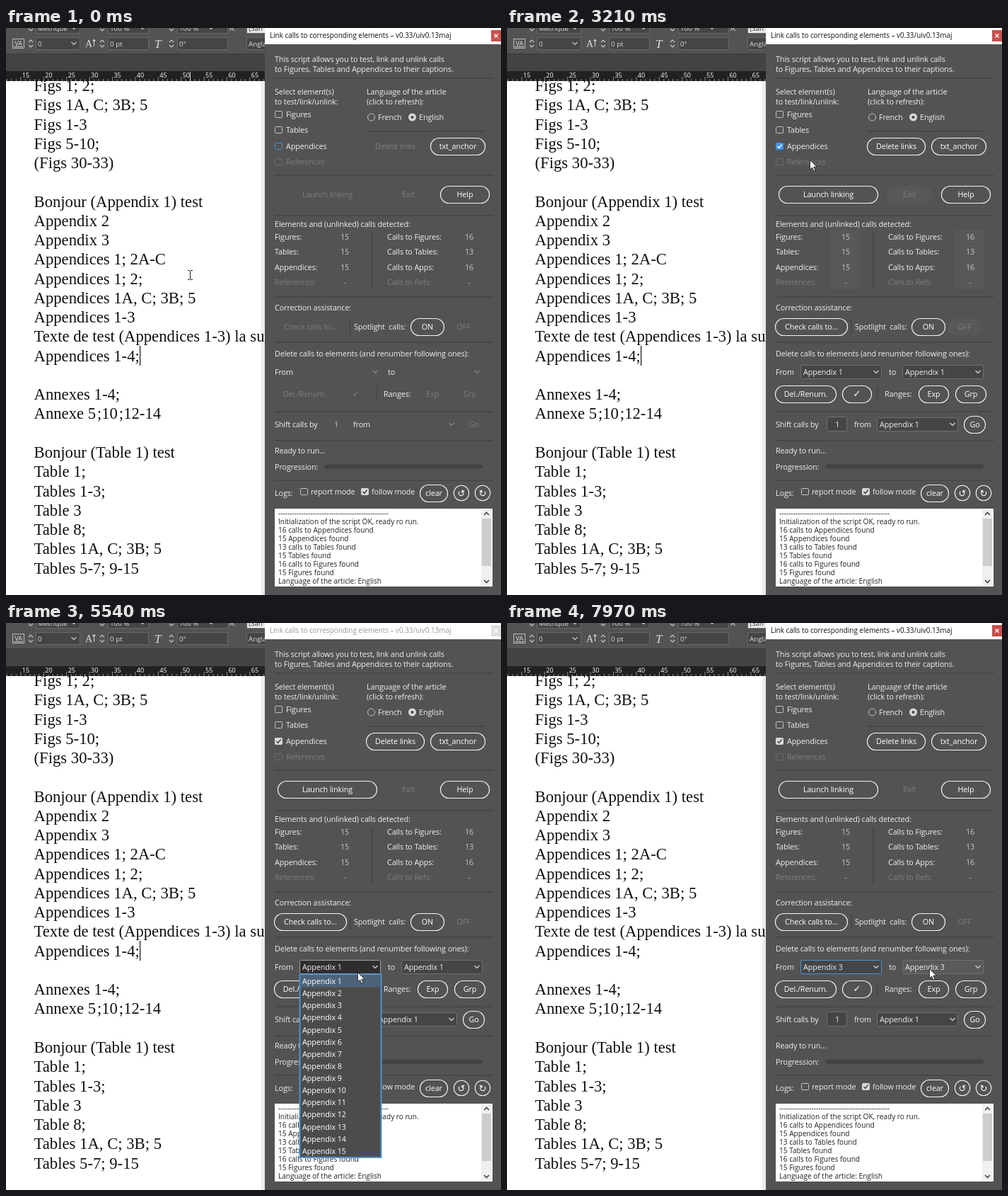
An HTML page for the animation above (8000 ms loop, 700x801 px).

```html
<!DOCTYPE html>
<html lang="en">
<head>
<meta charset="utf-8">
<title>Link calls panel</title>
<style>
html, body { margin: 0; width: 100%; height: 100%; overflow: hidden; background: #fff; }
svg { display: block; width: 700px; height: 801px; }
text { white-space: pre; }
.ui { font: 10.8px "Open Sans", "Noto Sans", sans-serif; letter-spacing: -.1px; }
.title { font: 9.9px "Open Sans", "Noto Sans", sans-serif; }
.log { font: 10.1px "Open Sans", "Noto Sans", sans-serif; }
.bar { font: 9.8px "Open Sans", "Noto Sans", sans-serif; }
.rule { font: 9px "Open Sans", "Noto Sans", sans-serif; }
.doc { font: 22.7px "Liberation Serif", "Times New Roman", serif; }
.sym { font: 13px "DejaVu Sans", sans-serif; }
</style>
</head>
<body>
<svg id="stage" viewBox="0 0 700 801">
  <g id="page"></g>
  <g id="panel"></g>
  <g id="list"></g>
  <g id="pointer"></g>
</svg>
<script>
const LOOP = 8000;
const TICK = 2650, OPEN = 5110, PICK = 6690;
const LIGHT = '#f0f0f0', DIM = '#7e7e7e', BG = '#535353', FIELD = '#454545', BLUE = '#4b93d6';

// Pointer moves: start, end, number of steps, then [step, x, y]
const moves = [
  [280, 1260, 8, [0, 260, 349], [2, 288, 316], [5, 392, 214], [8, 461, 142]],
  [1380, 2360, 8, [0, 461, 142], [2, 463, 134], [5, 446, 174], [8, 427, 166]],
  [3210, 4150, 8, [0, 427, 166], [2, 429, 205], [5, 421, 370], [7, 418, 422], [8, 424, 446]],
  [4270, 5110, 7, [0, 424, 446], [3, 464, 476], [6, 498, 486], [7, 498, 486]],
  [5540, 6540, 8, [0, 498, 486], [3, 496, 508], [6, 490, 533], [8, 489, 538]],
  [6690, 7670, 8, [0, 489, 538], [2, 491, 522], [4, 492, 512], [6, 498, 508], [8, 556, 494]],
  [7820, 7970, 2, [0, 556, 494], [2, 597, 488]]
];

function pointerAt(t) {
  let pos = [260, 349];
  for (const [start, end, n, ...pts] of moves) {
    if (t < start) break;
    // steps are not quite evenly spaced, hence the slack
    const step = Math.min(n, 1 + Math.floor((t - start) / (end - start) * (n - 1) + .1));
    const i = Math.max(1, pts.findIndex(p => p[0] >= step));
    const [a, b] = [pts[i - 1], pts[i]];
    const k = (step - a[0]) / (b[0] - a[0]);
    pos = [1, 2].map(j => Math.round(a[j] + (b[j] - a[j]) * k));
  }
  return pos;
}

const rect = (x, y, w, h, fill, more = '') =>
  `<rect x="${x}" y="${y}" width="${w}" height="${h}" fill="${fill}" ${more}/>`;
const text = (x, y, s, fill = LIGHT, cls = 'ui', anchor = 'start') =>
  `<text x="${x}" y="${y + 4}" fill="${fill}" class="${cls}" text-anchor="${anchor}">${s}</text>`;
const mid = (x, y, s, fill, cls) => text(x, y, s, fill, cls, 'middle');
const path = (d, stroke, width = 1, fill = 'none') =>
  `<path d="${d}" stroke="${stroke}" stroke-width="${width}" fill="${fill}"/>`;
const within = ([x, y], l, t, r, b) => x >= l && x <= r && y >= t && y <= b;
const chevron = (x, y, c) => path(`M${x - 3.5} ${y - 2}l3.5 3.5l3.5 -3.5`, c, 1.2);

// state: 0 disabled, 1 normal, 2 hovered; tint marks a faint disabled pill
function button(l, r, y, label, state = 1, tint = false, cls = 'ui') {
  const c = (l + r) / 2;
  let shape = '';
  if (state || tint) {
    const fill = state === 2 ? '#fff' : state ? 'none' : '#585858';
    shape = rect(l + .5, y - 11.5, r - l - 1, 24, fill, `rx="12" stroke="${state ? '#f4f4f4' : 'none'}" stroke-width="1.2"`);
  }
  return shape + mid(c, y, label, state === 2 ? '#333' : state ? '#fff' : DIM, cls);
}

function check(x, y, mode, border = '#b4b4b4') {
  const fill = { off: 'none', on: '#d8d8d8', focus: '#3f95f0' }[mode];
  const edge = mode === 'off' ? border : fill;
  const mark = mode === 'off' ? '' : path(`M${x - 3} ${y}l2.2 2.4l4 -5`, mode === 'on' ? '#404040' : '#fff', 1.5);
  return rect(x - 5, y - 4.5, 10, 9, fill, `rx="1" stroke="${edge}"`) + mark;
}

function select(l, y, label, on, fill = FIELD, border = '#6f6f6f') {
  if (!on) return chevron(l + 107, y, '#8c8c8c');
  return rect(l + .5, y - 9.5, 114, 19, fill, `rx="1" stroke="${border}"`) +
    text(l + 4, y, label) + chevron(l + 107, y, '#dcdcdc');
}

const docLines = ['Figs 1; 2;', 'Figs 1A, C; 3B; 5', 'Figs 1-3', 'Figs 5-10;', '(Figs 30-33)', '',
  'Bonjour (Appendix 1) test', 'Appendix 2', 'Appendix 3', 'Appendices 1; 2A-C', 'Appendices 1; 2;',
  'Appendices 1A, C; 3B; 5', 'Appendices 1-3', 'Texte de test (Appendices 1-3) la suite', 'Appendices 1-4;', '',
  'Annexes 1-4;', 'Annexe 5\u200a;10\u200a;12-14', '', 'Bonjour (Table 1) test', 'Table 1;', 'Tables 1-3;', 'Table 3',
  'Table 8;', 'Tables 1A, C; 3B; 5', 'Tables 5-7; 9-15'];

const logLines = ['-'.repeat(48), 'Initialization of the script OK, ready ro run.', '16 calls to Appendices found',
  '15 Appendices found', '13 calls to Tables found', '15 Tables found', '16 calls to Figures found',
  '15 Figures found', 'Language of the article: English'];

function spinner(x, y) {
  return path(`M${x + 2} ${y - 2}l3 -3l3 3M${x + 2} ${y + 2}l3 3l3 -3`, '#c8c8c8', 1.2);
}

function toolbar() {
  let s = rect(0, 0, 366, 37, BG) + rect(0, 37, 366, 24, '#434343') + rect(0, 36, 366, 1, '#3a3a3a');
  for (const [x, w, top, value] of [[42, 62, 'Métrique', '0'], [144, 57, '100 %', '0 pt'], [242, 71, '100 %', '0°'], [340, 30, '[San', 'Angla']]) {
    s += rect(x + .5, -8.5, w, 16, x > 330 ? '#e8e8e8' : FIELD, 'stroke="#686868"') +
      rect(x + .5, 13.5, w, 17, FIELD, 'stroke="#686868"') +
      text(x + 3, 0, top, x > 330 ? '#333' : '#ddd', 'bar') + text(x + 3, 22, value, '#ddd', 'bar');
  }
  for (const x of [30, 131, 229]) s += spinner(x, 22) + spinner(x, -1);
  s += rect(9.5, 15.5, 16, 13, 'none', 'stroke="#bbb"') + mid(17.5, 21, 'VA', '#ddd', 'rule') +
    path('M11 26.5h13', '#ccc') + chevron(96, 22, '#ccc') + chevron(96, 0, '#ccc') +
    chevron(193, 0, '#ccc') + chevron(290, 0, '#ccc') + text(316, 0, 'A:', '#ddd', 'bar') +
    `<text x="112" y="27" class="doc" fill="#ddd" style="font-size:14px">A</text>` + path('M124.5 26v-9m-2 2l2 -3l2 3', '#ddd') +
    `<text x="210" y="28" class="doc" fill="#ddd" style="font-size:17px;font-style:italic">T</text>`;
  s += rect(0, 61, 366, 14, '#212121');
  for (let i = 0; i < 60; i++) {
    const x = (-11.5 + i * 6.48).toFixed(1);
    s += path(`M${x} ${i % 5 ? 72 : 69}V75`, '#aaa', .8);
  }
  for (let n = 15, x = 28; n <= 65; n += 5, x += 32.4) s += mid(x, 66, n, '#fff', 'rule');
  return s;
}

function pageView() {
  return rect(0, 0, 366, 801, '#fff') + rect(361, 75, 5, 726, '#ececec') +
    docLines.map((s, i) => `<text x="39.5" y="${(89 + i * 27.26).toFixed(1)}" class="doc" fill="#111">${s}</text>`).join('') +
    toolbar();
}

function panelView(t, pos) {
  const on = t >= TICK, open = t >= OPEN && t < PICK, picked = t >= PICK;
  const tint = on && t < OPEN;
  const live = on ? 1 : 0;
  const hover = (l, top, r, b) => on && !open && within(pos, l, top, r, b);
  const fieldFill = l => hover(l, 476, l + 114, 496) ? '#5a5a5a' : FIELD;
  const toLabel = 'Appendix ' + (picked ? 3 : open ? hoveredItem(t, pos) : 1);

  let s = rect(366, 0, 334, 801, BG) + rect(366, 0, 334, 23, '#fff') +
    text(373, 10, 'Link calls to corresponding elements – v0.33/uiv0.13maj', open ? '#999' : '#111', 'title') +
    rect(686, 3, 14, 16, open ? '#dedede' : '#c9504c') +
    path('M690.5 8.5l5 5m0 -5l-5 5', '#fff', 1.3);

  for (const y of [70, 207, 264, 379, 443, 541, 582, 638]) s += rect(380, y, 309, 2, '#484848');
  s += rect(509, 145, 169, 2, '#484848');
  for (const [x, y, h] of [[517, 289, 79], [486, 412, 21], [523, 506, 22]]) s += rect(x, y, 1.5, h, '#454545');

  const labels = [[380, 44, 'This script allows you to test, link and unlink calls'],
    [380, 58, 'to Figures, Tables and Appendices to their captions.'],
    [380, 90, 'Select element(s)'], [380, 103.5, 'to test/link/unlink:'],
    [510, 90, 'Language of the article'], [510, 103.5, '(click to refresh):'],
    [526, 126, 'French'], [584, 126, 'English'],
    [380, 277, 'Elements and (unlinked) calls detected:'],
    [380, 395, 'Correction assistance:'], [492, 422, 'Spotlight  calls:'],
    [380, 460, 'Delete calls to elements (and renumber following ones):'],
    [380, 486, 'From'], [540, 486, 'to'], [534, 517, 'Ranges:'],
    [380, 560, 'Shift calls by'], [491, 560, 'from'],
    [380, 597, 'Ready to run...'], [380, 620, 'Progression:'],
    [380, 657, 'Logs:'], [431, 655, 'report mode'], [517, 655, 'follow mode']];
  s += labels.map(l => text(...l)).join('');

  const boxState = !on ? 'off' : t < OPEN ? 'focus' : 'on';
  ['Figures', 'Tables', 'Appendices', 'References'].forEach((name, i) => {
    const y = 122 + i * 22.3, last = i === 3;
    s += check(385.5, Math.round(y), i === 2 ? boxState : 'off', last ? '#6d6d6d' : i === 2 ? BLUE : '#c4c4c4') +
      text(396, y, name, last ? DIM : LIGHT);
    const row = 295 + i * 21.4, c = last ? DIM : LIGHT, v = last ? '#aaa' : '#c9c6cf';
    if (tint) s += rect(457, row - 10, 42, 20, '#585858') + rect(633, row - 10, 42, 20, '#585858');
    s += text(380, row, name + ':', c) + text(539, row, 'Calls to ' + ['Figures', 'Tables', 'Apps', 'Refs'][i] + ':', c) +
      mid(479, row, last ? '-' : 15, v) + mid(655, row, [16, 13, 16, '-'][i], v);
  });

  s += `<circle cx="516.5" cy="126" r="5" fill="none" stroke="#c4c4c4"/>` +
    `<circle cx="574.5" cy="126" r="5.5" fill="#d8d8d8"/><circle cx="574.5" cy="126" r="2" fill="#444"/>`;

  s += button(509, 592, 167, 'Delete links', live) + button(600, 678, 167, 'txt_anchor') +
    button(384, 525, 235, 'Launch linking', live) + button(536, 602, 235, 'Exit', 0, tint) + button(614, 684, 235, 'Help') +
    button(379, 482, 422, 'Check calls to...', hover(379, 410, 482, 435) ? 2 : live) +
    button(572, 620, 422, 'ON') + button(623, 671, 422, 'OFF', 0, tint) +
    button(379, 466, 517, 'Del./Renum.', live) +
    button(474, 516, 517, '✓', hover(474, 505, 516, 530) ? 2 : live, false, 'sym') +
    button(582, 625, 517, 'Exp', live) + button(634, 678, 517, 'Grp', live) +
    button(646, 677, 560, 'Go', live) + button(585, 625, 657, 'clear');
  for (const [x, glyph] of [[644, '↺'], [674, '↻']])
    s += `<circle cx="${x}" cy="657" r="10.7" fill="none" stroke="#f4f4f4" stroke-width="1.1"/>` + mid(x, 657.5, glyph, '#fff', 'sym');

  s += select(415, 486, 'Appendix ' + (picked ? 3 : 1), on, open ? '#2e2e2e' : fieldFill(415), picked ? BLUE : open ? '#a0a0a0' : undefined) +
    select(559, 486, toLabel, on, fieldFill(559)) +
    select(523, 560, 'Appendix 1', on);
  if (on) s += rect(452.5, 549.5, 28, 20, FIELD, 'rx="1" stroke="#6f6f6f"');
  s += mid(467, 560, 1, on ? LIGHT : '#c8c8c8');

  s += rect(450, 616.5, 224, 6, '#434343', 'rx="3"') +
    check(421.5, 655, 'off', '#c4c4c4') + check(507.5, 655, 'on');

  s += rect(380, 679, 308, 110, '#fff') +
    logLines.map((l, i) => text(385, 685 + i * 12, l, '#222', 'log')).join('') +
    rect(672, 680, 15, 108, '#f0f0f0') + rect(673, 693, 13, 67, '#cdcdcd') +
    path('M676 688l3.5 -3.5l3.5 3.5M676 780l3.5 3.5l3.5 -3.5', '#444', 1.6);
  return s;
}

function hoveredItem(t, pos) {
  return t < OPEN ? 1 : Math.max(1, Math.min(3, 1 + Math.floor((pos[1] - 497.5) / 17.1)));
}

function listView(t, pos) {
  if (t < OPEN || t >= PICK) return '';
  const item = hoveredItem(t, pos);
  let s = rect(415.5, 496.5, 115, 258.5, '#4c4c4c', `stroke="${BLUE}" stroke-width="2"`);
  for (let i = 1; i <= 15; i++) {
    const y = 506 + (i - 1) * 17.13;
    if (i === item) s += rect(416.5, y - 8.5, 113, 17, '#4c6379');
    s += text(419, y, 'Appendix ' + i, '#fff');
  }
  return s;
}

function pointerView(t, pos) {
  const [x, y] = pos;
  const caret = t < PICK || (t >= 7400 && t < 7820);
  let s = caret ? rect(189, 449, 1.2, 28, '#111') : '';
  if (x < 366) {
    return s + path(`M${x + .5} 62V75`, '#ddd', 1) +
      path(`M${x - 3} ${y - 6.5}h2.5l1 1l1 -1h2.5M${x + .5} ${y - 6}v12M${x - 3} ${y + 6.5}h2.5l1 -1l1 1h2.5`, '#111');
  }
  return s + path(`M${x + .5} ${y + .5}v13.5l3.1 -3l2.3 5.2l2.2 -1l-2.3 -5h4.4z`, '#222', .9, '#fff');
}

const layer = id => {
  const node = document.getElementById(id);
  let shown = null;
  return html => { if (html !== shown) node.innerHTML = shown = html; };
};
const [page, panel, list, pointer] = ['page', 'panel', 'list', 'pointer'].map(layer);
page(pageView());

const begin = performance.now();
function frame() {
  const t = (performance.now() - begin) % LOOP;
  const pos = pointerAt(t);
  panel(panelView(t, pos));
  list(listView(t, pos));
  pointer(pointerView(t, pos));
  requestAnimationFrame(frame);
}
frame();
</script>
</body>
</html>
```
